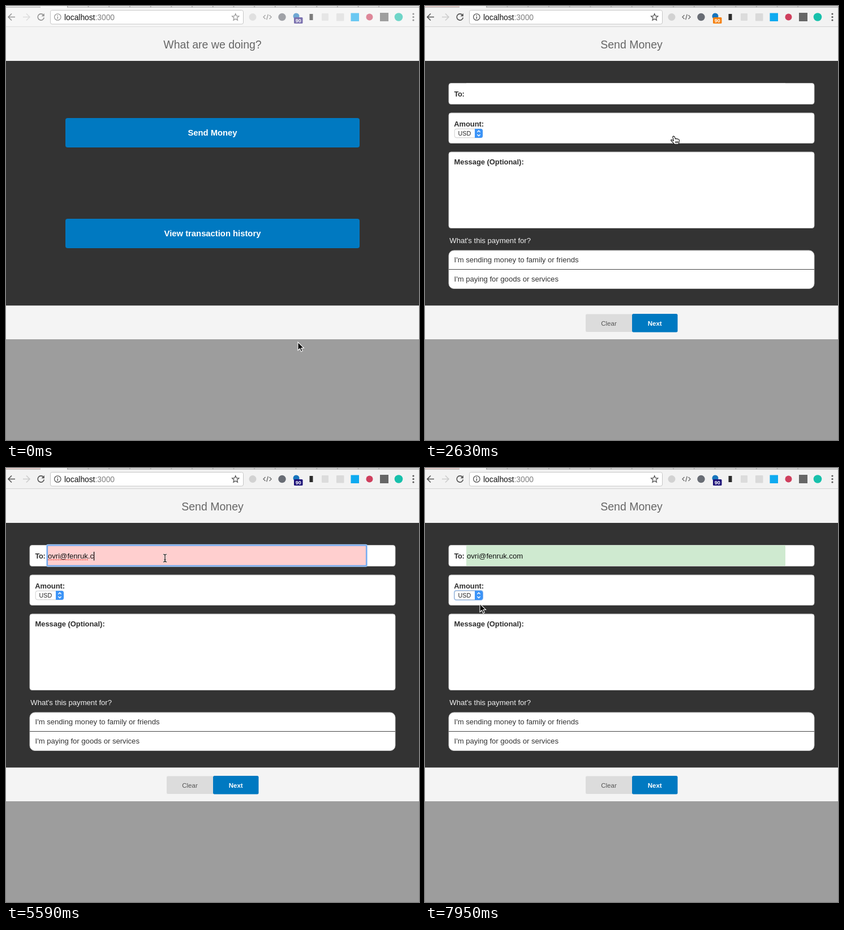
These frames come from a looping animation (730x767 px, 8000 ms). An HTML page:

```html
<!DOCTYPE html>
<html lang="en">
<head>
<meta charset="utf-8">
<title>Send Money</title>
<style>
html, body { margin: 0; width: 100%; height: 100%; overflow: hidden; background: #9d9d9d; }
svg { display: block; width: 730px; height: 767px; font: 13.1px "Liberation Sans", Arial, sans-serif; }
.b { font-weight: 700; }
.mid { text-anchor: middle; }
.label { font-weight: 700; font-size: 12.9px; fill: #2c2c2c; }
.title { font-size: 19.5px; fill: #666; }
.btn { font-weight: 700; font-size: 14.8px; fill: #fff; }
.box { fill: #fff; stroke: #c4c4c4; }
.line { fill: none; stroke: #555; stroke-width: 1.6; }

/* one 8 s loop, every change is a hard step */
.a { animation: 8s step-end infinite; }
.bar { fill: #f6f6f6; animation-name: bar; }
.edge { fill: #dedede; animation-name: edge; }
.tabs { fill: #e4e4e4; animation-name: tabs; }
.tint { opacity: 0; animation-name: wake; }
.icons { opacity: .6; animation-name: wake; }
.badge { fill: #2a1a80; animation-name: badge; }
.home { animation-name: home; }
.form { opacity: 0; animation-name: form; }
.send { fill: #0079c1; animation-name: hover; }
.press { opacity: 0; animation-name: press; }
.field { fill: #fff; animation-name: field; }
.focus { opacity: 0; animation-name: focus; }
.pick { opacity: 0; animation-name: pick; }
.menu { opacity: 0; animation-name: menu; }
.hl { animation-name: hl; }
.m1 { fill: #fff; animation-name: m1; }
.m2 { fill: #222; animation-name: m2; }
.m3 { fill: #222; animation-name: m3; }
.cur { animation-name: cur; }
.arrow { animation-name: arrow; }
.hand { opacity: 0; animation-name: hand; }
.beam { opacity: 0; animation-name: beam; }

@keyframes bar { 20%, 100% { fill: #f2f2f2; } }
@keyframes edge { 20%, 100% { fill: #d2d2d2; } }
@keyframes tabs { 20%, 100% { fill: #cfcfcf; } }
@keyframes wake { 20%, 100% { opacity: 1; } }
@keyframes badge { 23.75% { fill: #f5800f; } 40.375%, 100% { fill: #1c1078; } }
@keyframes home { 32.875%, 100% { opacity: 0; } }
@keyframes form { 32.875%, 100% { opacity: 1; } }
@keyframes hover { 20%, 100% { fill: #0589db; } }
@keyframes press { 23.75%, 100% { opacity: 1; } }
@keyframes field { 53.25% { fill: #ffcfcf; } 71.75%, 100% { fill: #cfead0; } }
@keyframes focus { 47.75% { opacity: 1; } 88.375%, 100% { opacity: 0; } }
@keyframes pick { 88.375%, 100% { opacity: 1; } }
@keyframes menu { 88.375% { opacity: 1; } 97.625% { opacity: .5; } 99.375%, 100% { opacity: 0; } }
@keyframes hl {
  0% { transform: none; }
  92.125% { transform: translateY(13.5px); }
  94% { transform: translateY(27px); }
  95.75%, 100% { transform: translateY(13.5px); }
}
@keyframes m1 { 92.125%, 100% { fill: #222; } }
@keyframes m2 { 92.125% { fill: #fff; } 94% { fill: #222; } 95.75%, 100% { fill: #fff; } }
@keyframes m3 { 94% { fill: #fff; } 95.75%, 100% { fill: #222; } }
@keyframes arrow { 0% { opacity: 1; } 15% { opacity: 0; } 79.25%, 100% { opacity: 1; } }
@keyframes hand { 15% { opacity: 1; } 38.5%, 100% { opacity: 0; } }
@keyframes beam { 38.5% { opacity: 1; } 79.25%, 100% { opacity: 0; } }
@keyframes cur {
  0% { transform: translate(516px, 594px); }
  1.875% { transform: translate(512px, 560px); }
  3.75% { transform: translate(495px, 470px); }
  5.625% { transform: translate(472px, 370px); }
  7.5% { transform: translate(458px, 290px); }
  9.375% { transform: translate(456px, 245px); }
  11.25% { transform: translate(461px, 222px); }
  13.125% { transform: translate(470px, 206px); }
  15% { transform: translate(471px, 213px); }
  21.875% { transform: translate(460px, 221px); }
  23.75% { transform: translate(446px, 228px); }
  25.375% { transform: translate(439px, 230px); }
  38.5% { transform: translate(424px, 226px); }
  40.375% { transform: translate(388px, 207px); }
  42.25% { transform: translate(338px, 180px); }
  44% { transform: translate(300px, 164px); }
  45.875% { transform: translate(281px, 159px); }
  77.375% { transform: translate(276px, 164px); }
  79.25% { transform: translate(258px, 190px); }
  81% { transform: translate(220px, 207px); }
  82.875% { transform: translate(165px, 220px); }
  84.75% { transform: translate(114px, 227px); }
  86.5% { transform: translate(98px, 226px); }
  92.125% { transform: translate(98px, 234px); }
  94% { transform: translate(97px, 247px); }
  95.75% { transform: translate(97px, 243px); }
  97.625%, 100% { transform: translate(97px, 240px); }
}
</style>
</head>
<body>
<svg viewBox="0 0 730 767">
  <defs>
    <pattern id="seps" x="108" width="36.7" height="3" patternUnits="userSpaceOnUse">
      <rect width="1.5" height="3" fill="#aaa"/>
    </pattern>
    <filter id="soft" x="-30%" y="-30%" width="160%" height="170%">
      <feDropShadow dx="0" dy="3" stdDeviation="2.5" flood-opacity=".35"/>
    </filter>
  </defs>

  <!-- browser bar -->
  <rect class="a bar" width="730" height="37"/>
  <path class="a tabs" d="M0 0H61V2.5H0ZM108 0H730V2.5H108Z"/>
  <rect class="a tint" width="61" height="2" fill="#e3cdca"/>
  <path d="M0 2.5H61M108 2.5H730" stroke="#b9b9b9"/>
  <rect x="108" width="552" height="2.5" fill="url(#seps)"/>
  <rect class="a edge" y="36" width="730" height="1"/>
  <rect x="78.5" y="7.5" width="341" height="24.5" rx="3" fill="#fff" stroke="#c6c6c6"/>
  <text x="103" y="24.5" font-size="13.8" fill="#111">localhost<tspan fill="#808080">:3000</tspan></text>

  <g class="a icons">
    <path class="line" d="M16 19.5H4.5M10 13.5L4 19.5L10 25.5"/>
    <path class="line" d="M30 19.5H41.5M36 13.5L42 19.5L36 25.5" style="stroke:#ccc"/>
    <path class="line" d="M66.2 16A5.6 5.6 0 1 0 67.3 20.5"/>
    <path d="M67.8 13V18.3H62.5Z" fill="#555"/>
    <circle class="line" cx="91.3" cy="19.5" r="5.7" style="stroke-width:1.3"/>
    <path d="M91.3 18.8V22.8M91.3 16V17.5" stroke="#555" stroke-width="1.5"/>
    <path class="line" style="stroke-width:1.3" d="M405.7 13.7L407.4 17.7L411.7 18.1L408.4 20.9L409.4 25.1L405.7 22.9L402 25.1L403 20.9L399.7 18.1L404 17.7Z"/>
    <circle cx="436" cy="19.5" r="6.5" fill="#d2d2d2"/>
    <path class="line" style="stroke:#777;stroke-width:1.5" d="M458.5 16L455 19.5L458.5 23M465.5 16L469 19.5L465.5 23M463.3 14.8L460.7 24.2"/>
    <circle cx="488" cy="19.5" r="6.7" fill="#686c74"/>
    <circle cx="513" cy="18" r="5.5" fill="#1775bd"/>
    <rect class="a badge" x="509" y="20" width="15.5" height="11" rx="1.5"/>
    <text class="b mid" x="516.8" y="29" font-size="9" fill="#fff">90</text>
    <rect x="536.5" y="14" width="6" height="11" fill="#2b2b2b"/>
    <rect x="558" y="13" width="12" height="13" rx="1" fill="#dcdcdc"/>
    <rect x="584" y="13" width="13.5" height="13.5" rx="1" fill="#dadada"/>
    <rect x="609.5" y="12.5" width="14.5" height="14.5" fill="#0eaaf0"/>
    <circle cx="642.5" cy="19.5" r="6" fill="#cf3f5d"/>
    <rect x="661" y="12" width="15" height="15" fill="#666"/>
    <circle cx="694" cy="19.5" r="7.3" fill="#17c0ab"/>
    <g fill="#555"><circle cx="720" cy="14" r="1.6"/><circle cx="720" cy="19.5" r="1.6"/><circle cx="720" cy="25" r="1.6"/></g>
  </g>

  <!-- page -->
  <rect y="37" width="730" height="60" fill="#f4f4f4"/>
  <rect y="97" width="730" height="432.5" fill="#333"/>
  <rect y="529.5" width="730" height="59.5" fill="#f4f4f4"/>

  <g class="a home">
    <text class="title mid" x="365" y="75">What are we doing?</text>
    <rect class="a press" x="103" y="196" width="524" height="56" rx="3" fill="#12304f" stroke="#3a6fb2" stroke-width="3"/>
    <rect class="a send" x="105" y="198" width="520" height="52" rx="4"/>
    <text class="btn mid" x="365" y="229.3">Send Money</text>
    <rect x="105" y="376" width="520" height="52" rx="4" fill="#0079c1"/>
    <text class="btn mid" x="365" y="407.3">View transaction history</text>
  </g>

  <g class="a form">
    <text class="title mid" x="365" y="75">Send Money</text>
    <rect class="box" x="42" y="136.5" width="646" height="37" rx="4"/>
    <rect class="box" x="42" y="189" width="646" height="53.5" rx="4"/>
    <rect class="box" x="42" y="258" width="646" height="134.5" rx="4"/>
    <rect class="box" x="42" y="432" width="646" height="67.5" rx="9"/>
    <path d="M42 465.5H688" stroke="#444"/>
    <text class="label" x="51.5" y="160.3" letter-spacing="-.4">To:</text>
    <text class="label" x="51.2" y="213">Amount:</text>
    <text class="label" x="51.5" y="280">Message (Optional):</text>
    <text x="43.3" y="419" fill="#f0f0f0">What's this payment for?</text>
    <g fill="#333">
      <text x="51.5" y="453.3">I'm sending money to family or friends</text>
      <text x="51.5" y="487.3">I'm paying for goods or services</text>
    </g>
    <path d="M366 544.5H286a2 2 0 0 0-2 2V574a2 2 0 0 0 2 2H366Z" fill="#dcdcdc"/>
    <rect x="366" y="544" width="80.5" height="32.5" rx="2.5" fill="#0079c1"/>
    <text class="mid" x="325" y="564.7" font-size="11.5" fill="#555">Clear</text>
    <text class="b mid" x="406.2" y="564.7" font-size="11.5" fill="#fff">Next</text>

    <rect class="a field" x="73" y="136.5" width="564" height="36.5"/>
    <g class="a focus">
      <rect x="72" y="135.7" width="566" height="38" rx="2" fill="none" stroke="#a9cdfa" stroke-width="2"/>
      <rect x="73.2" y="137" width="563.6" height="35.5" fill="none" stroke="#69a4ee" stroke-width="1.6"/>
      <path id="wavy" stroke="#e8473c" stroke-width="1.6" stroke-dasharray="1.7 1.3"/>
      <rect id="caret" y="148" width="1.2" height="15.5"/>
    </g>
    <text id="typed" x="74" y="160.3" fill="#111"></text>

    <rect class="a pick" x="51" y="216" width="52" height="18" rx="4.5" fill="#7db2f4"/>
    <rect x="52.2" y="217.2" width="49.6" height="15.6" rx="3.5" fill="#fff" stroke="#c2c2c2" stroke-width=".8"/>
    <path d="M88 217H98.500a3.500 3.500 0 0 1 3.500 3.500V229.500a3.500 3.500 0 0 1-3.500 3.500H88Z" fill="#3c94f7"/>
    <path d="M92.400 223L95 220.200L97.600 223M92.400 227L95 229.800L97.600 227" fill="none" stroke="#fff" stroke-width="1.4"/>
    <text x="58.600" y="228.800" font-size="10.700" fill="#222">USD</text>

    <g class="a menu" font-size="10.700">
      <rect x="46" y="214" width="58" height="48.500" rx="4" fill="#f4f4f4" filter="url(#soft)"/>
      <rect class="a hl" x="46" y="218" width="58" height="13.500" fill="#3b8df5"/>
      <text class="a m1" x="58.600" y="228.800">USD</text>
      <text class="a m2" x="58.600" y="242.300">EUR</text>
      <text class="a m3" x="58.600" y="255.800">JPY</text>
      <path class="line" style="stroke-width:1.3" d="M49.500 225L51.500 227.500L55 221.500"/>
    </g>
  </g>

  <g class="a cur">
    <path class="a arrow" d="M0 0V14.500L3.400 11.500L5.800 16.700L8.200 15.600L5.900 10.500H10.500Z" stroke="#fff" stroke-width="1.1"/>
    <path class="a hand" fill="#fff" stroke="#111" stroke-width="1.1" stroke-linejoin="round"
      d="M-1.200 1.200C-.5-.3 1.600-.2 2.200 1.300L3.500 5C4.500 4 6 4.200 6.200 5.200C7.200 4.400 8.300 4.800 8.600 5.800C9.800 5.400 10.600 6.200 10.500 7.600C10.500 10 10 12 9 14.500H2C.5 12-2 9.800-4 8C-5 6.600-3.500 5.800-2 6.800L.5 8.200ZM4 9V12.500M6 9V12.500M8 9V12.500"/>
    <g class="a beam" fill="none">
      <path id="ibeam" d="M-3-6.500Q0-6.500 0-4.500Q0-6.500 3-6.500M0-4.500V5M-3 7Q0 7 0 5Q0 7 3 7M-1.500 3H1.500" stroke="#fff" stroke-opacity=".7" stroke-width="2.600"/>
      <use href="#ibeam" style="display:none"/>
      <path d="M-3-6.500Q0-6.500 0-4.500Q0-6.500 3-6.500M0-4.500V5M-3 7Q0 7 0 5Q0 7 3 7M-1.500 3H1.500" stroke="#111" stroke-width="1.200"/>
    </g>
  </g>
</svg>
<script>
const LOOP = 8000;
const mail = "ovri@fenruk.com";
// [time, letters shown, letters underlined]
const keys = [
  [0, 0, 0], [4260, 3, 0], [4410, 4, 0], [4710, 5, 4], [4850, 6, 4], [5000, 7, 4],
  [5150, 8, 4], [5300, 10, 4], [5450, 11, 4], [5590, 13, 11], [5740, 15, 11]
];
const [typed, caret, wavy] = ["typed", "caret", "wavy"].map(id => document.getElementById(id));
let start, shown;

function show(key) {
  const [, count, marked] = key;
  const width = n => n ? typed.getSubStringLength(0, n) : 0;
  typed.textContent = mail.slice(0, count);
  caret.setAttribute("x", 74 + width(count));
  wavy.setAttribute("d", marked ? `M74 162.300H${74 + width(marked)}` : "");
}

function tick(now) {
  start ??= now;
  const t = (now - start) % LOOP;
  const key = keys.findLast(k => k[0] <= t) || keys[0];
  if (key !== shown) show(shown = key);
  requestAnimationFrame(tick);
}
requestAnimationFrame(tick);
</script>
</body>
</html>
```
